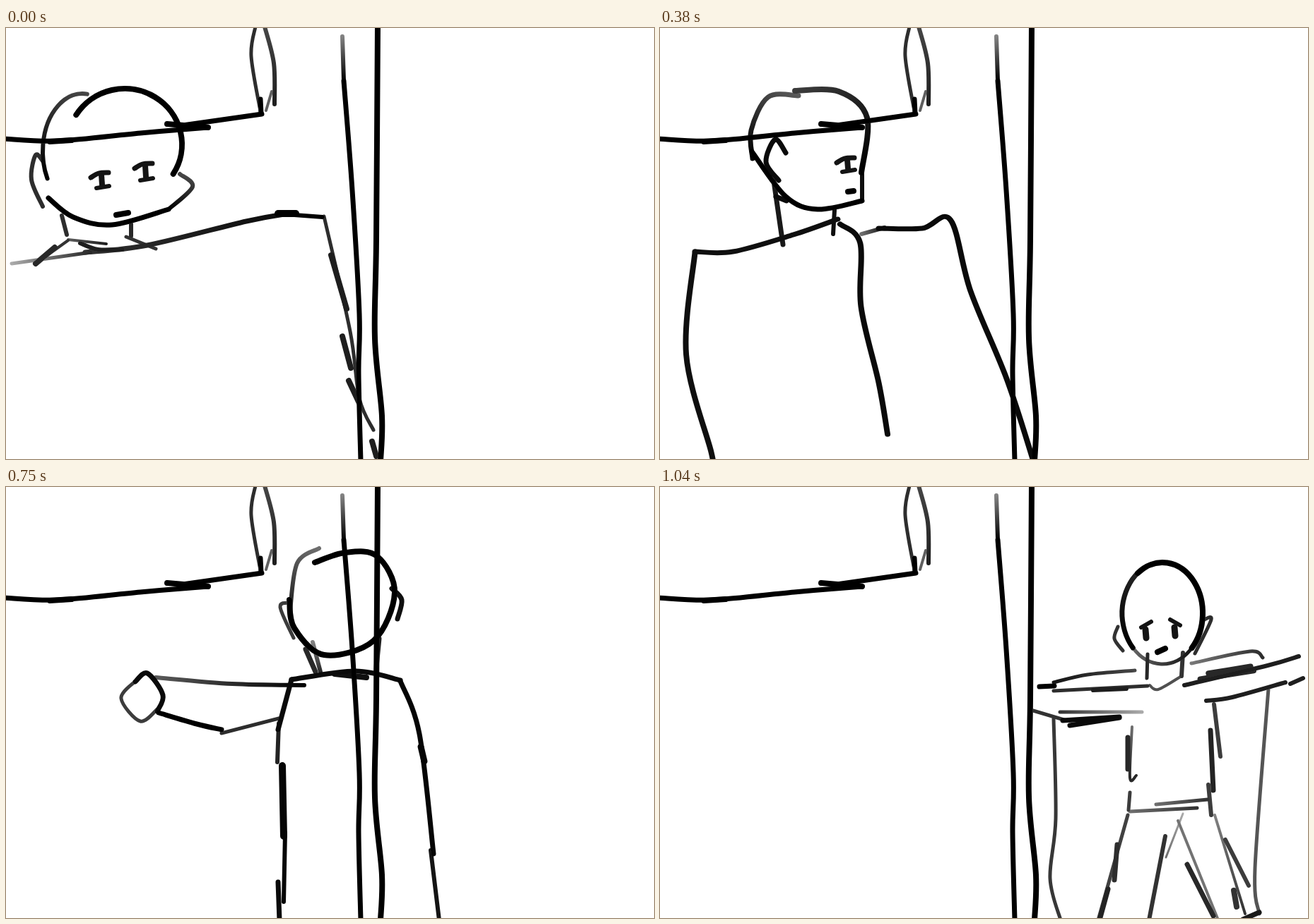
These frames come from a looping animation (917 by 611 pixels, 1.71 s). An HTML page with a canvas:

```html
<!DOCTYPE html>
<html lang="en">
<head>
<meta charset="utf-8">
<title>Turning sketch</title>
<style>
  html, body { margin: 0; height: 100%; overflow: hidden; background: #fff; }
  canvas { display: block; }
</style>
</head>
<body>
<canvas id="stage" width="917" height="611"></canvas>
<script>
const ctx = document.getElementById('stage').getContext('2d');
const mix = (a, b, t) => a + (b - a) * t;
const random = seed => Math.abs(Math.sin(seed * 12.9898) * 43758.5) % 1;
const tone = grey => `rgb(${grey},${grey},${grey})`;

// Grey is one shade, or a pair that fades from the first point to the last.
function setPen(width, grey, ...ends) {
  ctx.lineWidth = width;
  if (!Array.isArray(grey)) return ctx.strokeStyle = tone(grey);
  const fade = ctx.createLinearGradient(...ends);
  grey.forEach((shade, i) => fade.addColorStop(i, tone(shade)));
  ctx.strokeStyle = fade;
}

// Smooth stroke through a few points.
function ink(width, grey, ...p) {
  const last = p.length - 2;
  const near = i => Math.max(0, Math.min(last, i));
  setPen(width, grey, p[0], p[1], p[last], p[last + 1]);
  ctx.beginPath();
  ctx.moveTo(p[0], p[1]);
  for (let i = 0; i < last; i += 2) {
    const a = near(i - 2), b = i + 2, c = near(i + 4);
    ctx.bezierCurveTo(
      p[i] + (p[b] - p[a]) / 6, p[i + 1] + (p[b + 1] - p[a + 1]) / 6,
      p[b] - (p[c] - p[i]) / 6, p[b + 1] - (p[c + 1] - p[i + 1]) / 6,
      p[b], p[b + 1]);
  }
  ctx.stroke();
}

// Part of an ellipse, angles in degrees.
function arc(width, grey, x, y, rx, ry, from, to) {
  const [a, b] = [from, to].map(deg => deg * Math.PI / 180);
  const end = r => [x + rx * Math.cos(r), y + ry * Math.sin(r)];
  setPen(width, grey, ...end(a), ...end(b));
  ctx.beginPath();
  ctx.ellipse(x, y, rx, ry, 0, a, b, b < a);
  ctx.stroke();
}

// Rough strokes side by side, each with its own ragged ends.
function shade(width, grey, x0, y0, x1, y1, count) {
  for (let i = 0; i < count; i++) {
    const s = random(x0 + i) * .3, e = 1 - random(y0 + i) * .3, down = i * width * .8;
    ink(width, grey, mix(x0, x1, s), mix(y0, y1, s) + down, mix(x0, x1, e), mix(y0, y1, e) + down);
  }
}

function tiredEye(x, y, height = 18) {
  ink(7, 20, x - 15, y + 6, x - 4, y, x + 10, y - 1);
  ink(8, 20, x, y + 2, x + 1, y + height);
  ink(6, 20, x - 7, y + height + 5, x + 11, y + height + 2);
}

function browEye(x, y, slope) {
  ink(9, 20, x, y, x + 1, y + 12);
  ink(6, 20, x - 6, y - 7 + slope, x + 8, y - 7 - slope);
}

const mouth = (x, y, width, rise) => ink(8, 0, x, y, x + width, y - rise);

function shifted(dx, dy, draw) {
  ctx.save();
  ctx.translate(dx, dy);
  draw();
  ctx.restore();
}

function room() {
  ink(6, [130, 0], 476, 12, 478, 75);
  ink(7, 0, 478, 75, 490, 230, 500, 405, 499, 490, 502, 614);
  ink(8, 0, 526, -4, 524, 300, 522, 440, 532, 550, 530, 614);
  ink(7, 0, -3, 157, 75, 160, 190, 149, 286, 141);
  ink(8, 0, 62, 161, 93, 159);
  ink(8, 0, 228, 136, 286, 141);
  ink(7, 0, 250, 138, 362, 122);
  ink(7, 0, 361, 121, 360, 101);
  ink(5, 45, 353, -2, 347, 40, 360, 118);
  ink(6, [70, 30], 366, -2, 379, 50, 380, 108);
  ink(4, 95, 376, 90, 368, 117);
}

function frontHead() {
  arc(8, 0, 168, 165, 81, 79, 212, 392);
  arc(6, [70, 0], 108, 175, 56, 82, 277, 152);
  ink(7, 0, 60, 241, 95, 268, 150, 279, 230, 257);
  ink(6, [0, 70], 230, 257, 264, 225, 246, 207);
  ink(6, 45, 53, 190, 42, 180, 36, 215, 52, 253);
  tiredEye(135, 206, 16);
  tiredEye(197, 193);
  mouth(156, 265, 17, 3);
}

function frontBody() {
  ink(6, 45, 79, 266, 86, 293);
  ink(6, 40, 177, 278, 177, 295);
  ink(6, 30, 105, 305, 130, 314, 165, 314);
  ink(4, [90, 30], 88, 300, 142, 306);
  ink(5, 50, 170, 296, 212, 313);
  ink(4, 50, 88, 301, 42, 334);
  ink(8, 40, 69, 311, 42, 334);
  ink(5, [170, 40], 8, 334, 120, 318);
  ink(7, [50, 10], 112, 318, 200, 308, 340, 274, 400, 263);
  ink(10, 0, 385, 263, 410, 263);
  ink(6, 0, 408, 265, 448, 268);
  ink(5, 45, 450, 267, 487, 430, 500, 525, 520, 570);
  for (const [x, y, dx, dy] of [[460, 322, 22, 76], [476, 437, 12, 45], [485, 500, 15, 32], [518, 586, 6, 21]])
    ink(8, 30, x, y, x + dx, y + dy);
}

function leanHead() {
  arc(6, 15, 160, 160, 83, 88, 161, 363);
  ink(5, [100, 50], 131, 97, 118, 97, 105, 101);
  ink(6, [0, 40], 243, 148, 250, 205, 248, 248, 218, 278);
  ink(7, 15, 102, 257, 140, 279, 190, 284, 237, 268);
  ink(6, [60, 10], 86, 202, 74, 189, 62, 215, 97, 254);
}

function leanFace() {
  tiredEye(177, 199);
  tiredEye(225, 188);
  mouth(192, 253, 12, 5);
}

function leanBody() {
  ink(6, 50, 120, 278, 121, 299);
  ink(7, 10, 202, 280, 202, 302);
  ink(7, 10, 6, 352, 110, 320, 200, 304, 235, 294, 248, 299);
  ink(7, 5, 248, 310, 249, 301, 261, 291);
  ink(7, 0, 252, 297, 345, 279, 420, 257);
  ink(6, 50, 392, 265, 445, 261);
  ink(8, 5, 446, 262, 463, 310, 475, 440, 500, 535, 522, 614);
  ink(6, [80, 15], 11, 357, 23, 450, 17, 614);
  ink(6, [130, 0], 253, 312, 273, 358);
  ink(8, 0, 273, 358, 264, 450, 285, 520, 305, 597);
  ink(7, 25, 306, 578, 316, 614);
}

function sideHead() {
  ink(7, [90, 0], 238, 91, 195, 93, 171, 140, 173, 180);
  ink(8, [60, 0], 233, 84, 295, 85, 335, 122, 327, 200);
  ink(6, 15, 328, 192, 328, 240);
  ink(7, 0, 328, 240, 265, 252, 220, 234, 172, 170);
  ink(7, 10, 220, 172, 205, 153, 192, 185, 210, 211);
  tiredEye(307, 180, 14);
  mouth(308, 227, 8, 1);
  ink(7, 25, 203, 212, 216, 302);
  ink(7, 10, 206, 234, 221, 240);
  ink(6, 15, 289, 253, 287, 287);
}

function sideBody() {
  ink(7, 15, 129, 614, 128, 598, 97, 460, 108, 314);
  ink(7, 15, 108, 314, 155, 314, 230, 290, 285, 268);
  ink(7, 10, 288, 275, 313, 302, 314, 392, 336, 500, 347, 573);
  ink(6, [110, 15], 315, 289, 343, 280);
  ink(7, 10, 336, 281, 390, 281, 425, 269, 450, 370, 495, 495, 528, 611);
}

function awayHead() {
  arc(7, [0, 80], 335, 155, 89, 80, 100, 247);
  arc(7, [110, 0], 335, 154, 89, 81, 245, 388);
  ink(6, [110, 30], 418, 188, 407, 230, 385, 239);
  ink(6, 15, 367, 153, 352, 143, 347, 170, 366, 196);
  ink(11, 5, 408, 149, 408, 159);
  ink(7, 45, 300, 238, 304, 265);
  ink(5, 60, 300, 238, 311, 255);
  ink(5, [0, 70], 378, 220, 373, 268);
}

function awayBody() {
  shade(7, 10, 205, 287, 305, 264, 3);
  ink(8, 0, 300, 276, 352, 260);
  ink(8, 0, 310, 271, 370, 264, 410, 265);
  ink(6, [60, 140], 272, 313, 302, 303);
  ink(6, 25, 412, 268, 443, 372, 465, 485, 493, 597);
  ink(7, 15, 412, 264, 440, 275, 500, 410, 527, 520, 539, 614);
  ink(8, 10, 229, 332, 237, 430, 236, 502);
  ink(6, 30, 241, 485, 228, 614);
  ink(7, 0, 230, 525, 229, 606);
  ink(5, 65, 165, 302, 140, 294, 113, 322, 122, 337, 121, 355, 145, 366, 160, 352);
  ink(7, 15, 145, 368, 196, 450);
  ink(7, 5, 196, 438, 230, 435);
  ink(6, [110, 30], 165, 306, 222, 403);
  ink(8, 5, 206, 321, 194, 366);
  ink(5, [30, 110], 218, 393, 227, 465);
}

function backPose() {
  ink(8, 0, 437, 107, 480, 93, 525, 98, 550, 150, 520, 218, 450, 238, 408, 200, 401, 160);
  ink(6, [110, 30], 443, 87, 412, 108, 402, 175);
  ink(5, 60, 403, 164, 388, 170, 407, 214);
  ink(7, 15, 546, 144, 560, 160, 554, 187);
  ink(7, 40, 424, 230, 438, 262);
  ink(6, [130, 40], 434, 220, 445, 262);
  ink(7, 30, 528, 215, 523, 265);
  ink(7, 10, 404, 273, 495, 261, 558, 274);
  ink(8, 15, 465, 265, 510, 270);
  ink(7, 5, 558, 275, 585, 350, 605, 520);
  ink(9, 5, 587, 368, 592, 389);
  ink(6, 20, 601, 515, 613, 614);
  ink(7, 10, 404, 273, 385, 344);
  ink(6, 35, 386, 335, 384, 390);
  ink(10, 5, 391, 395, 393, 495);
  ink(6, 5, 395, 490, 393, 588);
  ink(7, 10, 385, 560, 387, 614);
  ink(6, [90, 0], 212, 270, 320, 279, 422, 281);
  ink(7, 0, 216, 320, 270, 336, 305, 344);
  ink(5, 45, 305, 349, 390, 327);
  ink(7, 10, 183, 276, 200, 264, 222, 295, 214, 318);
  ink(5, 60, 182, 276, 163, 300, 190, 332, 215, 314);
}

function reachHead() {
  arc(8, 0, 585, 172, 73, 78, 107, -208);
  ink(6, 15, 513, 205, 526, 254, 575, 257);
  ink([5], 60, 550, 108, 563, 111);
  browEye(549, 198, -4);
  ink(6, 15, 524, 240, 536, 239);
  arc(7, [50, 0], 585, 194, 18, 19, 235, 460);
  ink(8, 5, 573, 258, 571, 280);
  ink(5, 40, 617, 234, 613, 285);
}

function reachBody() {
  ink(7, 5, 436, 318, 510, 311, 607, 274);
  ink(5, 20, 522, 280, 572, 267);
  ink(6, [110, 10], 447, 350, 520, 345, 611, 316);
  ink(5, 65, 432, 303, 400, 306, 387, 330, 412, 345);
  ink(6, 20, 416, 311, 443, 311, 439, 338, 425, 347, 412, 345);
  ink(8, 5, 612, 290, 631, 345);
  ink(5, 60, 633, 317, 650, 437);
  ink(8, 15, 638, 350, 648, 437);
  ink(7, 20, 636, 390, 637, 450);
  ink(5, 70, 655, 433, 654, 480);
  ink(7, 35, 652, 480, 620, 510, 581, 524);
  ink(6, 25, 571, 330, 568, 445);
  ink(6, 25, 583, 440, 543, 463);
  ink(7, 10, 585, 450, 540, 495);
  ink(6, 20, 548, 460, 546, 510, 577, 614);
  ink(8, 15, 545, 505, 557, 562);
  ink(5, 60, 607, 510, 626, 614);
  ink(7, 50, 613, 545, 623, 571);
  ink(6, [110, 25], 625, 249, 645, 248, 670, 270, 720, 270);
  ink(6, 25, 720, 270, 768, 264, 793, 380, 773, 490, 775, 540, 740, 604);
}

function endHead() {
  const part = (width, grey, from, to) => arc(width, grey, 711, 179, 57, 72, from, to);
  part(8, 0, 232, 403);
  part(7, [40, 0], 250, 137);
  part(5, [100, 20], 137, 43);
  ink(5, 50, 648, 198, 643, 215, 655, 232);
  ink(5, 45, 770, 188, 780, 188, 757, 236);
  browEye(687, 202, 4);
  browEye(728, 199, -4);
  mouth(704, 234, 11, 5);
  ink(5, 40, 690, 237, 689, 271);
  ink(6, 50, 740, 235, 738, 268);
  ink(4, 80, 693, 281, 705, 287, 738, 268);
}

function endArms() {
  ink(7, 0, 537, 283, 558, 282);
  ink(5, [20, 70], 557, 277, 605, 266, 672, 260);
  ink(5, 45, 557, 289, 690, 282);
  ink(6, 30, 613, 288, 660, 286);
  ink(5, 50, 528, 317, 575, 331);
  ink(5, [50, 170], 566, 319, 682, 319);
  ink(7, 10, 570, 331, 650, 326);
  ink(7, 10, 580, 338, 650, 327);
  ink(5, [120, 45], 752, 250, 835, 233, 853, 242);
  ink(6, 30, 742, 281, 860, 253, 904, 240);
  shade(8, 40, 758, 267, 858, 251, 2);
  ink(6, 30, 773, 303, 810, 298, 885, 277);
  ink(6, 30, 892, 279, 910, 271);
  ink(5, 55, 557, 328, 560, 470, 552, 555, 567, 614);
  ink(5, 85, 861, 286, 842, 540, 848, 605);
  ink(7, 25, 825, 613, 848, 603);
}

function endBody() {
  ink(4, [110, 40], 668, 340, 665, 412, 674, 409);
  ink(7, 40, 662, 355, 662, 400);
  ink(5, 60, 665, 433, 663, 458);
  ink(6, 60, 784, 308, 793, 382);
  ink(7, 35, 779, 345, 783, 430);
  ink(6, 60, 776, 422, 780, 465);
  ink(5, [110, 50], 702, 450, 775, 443);
  ink(5, [110, 50], 665, 460, 760, 455);
  ink(5, 65, 662, 465, 620, 614);
  ink(7, 45, 647, 507, 643, 557);
  ink(7, 35, 634, 570, 622, 614);
  ink(6, 50, 715, 495, 692, 614);
  ink(3, [170, 110], 740, 463, 716, 525);
  ink(4, 115, 733, 473, 790, 614);
  ink(7, 40, 746, 535, 783, 608);
  ink(4, [130, 50], 785, 465, 828, 605);
  ink(6, 60, 800, 500, 833, 565);
  ink(8, 50, 812, 572, 816, 595);
}

function endPose() { endHead(); endArms(); endBody(); }

function leanTween() {
  shifted(-6, 3, leanHead);
  shifted(-26, 0, leanFace);
  leanBody();
}

// The hand stays on the door frame while the body swings round it.
function sideTween() {
  shifted(-42, 5, sideHead);
  ctx.save();
  ctx.translate(525, 3);
  ctx.scale(1.14, 1);
  ctx.translate(-525, 0);
  sideBody();
  ctx.restore();
}

// Each pose holds until its end time.
const poses = [
  [130, frontHead, frontBody],
  [250, leanTween],
  [380, leanHead, leanFace, leanBody],
  [500, sideTween],
  [630, sideHead, sideBody],
  [750, awayHead, awayBody],
  [880, backPose],
  [960, reachHead, reachBody],
  [1040, () => shifted(-48, -4, endPose)],
  [1710, endPose]
];

ctx.lineCap = ctx.lineJoin = 'round';
const start = performance.now();
let shown;

function tick() {
  const time = (performance.now() - start) % 1710;
  const pose = poses.find(([end]) => time < end);
  if (pose !== shown) {
    shown = pose;
    ctx.globalCompositeOperation = 'source-over';
    ctx.fillStyle = '#fff';
    ctx.fillRect(0, 0, 917, 611);
    ctx.globalCompositeOperation = 'darken';
    room();
    pose.slice(1).forEach(draw => draw());
  }
  requestAnimationFrame(tick);
}
tick();
</script>
</body>
</html>
```
